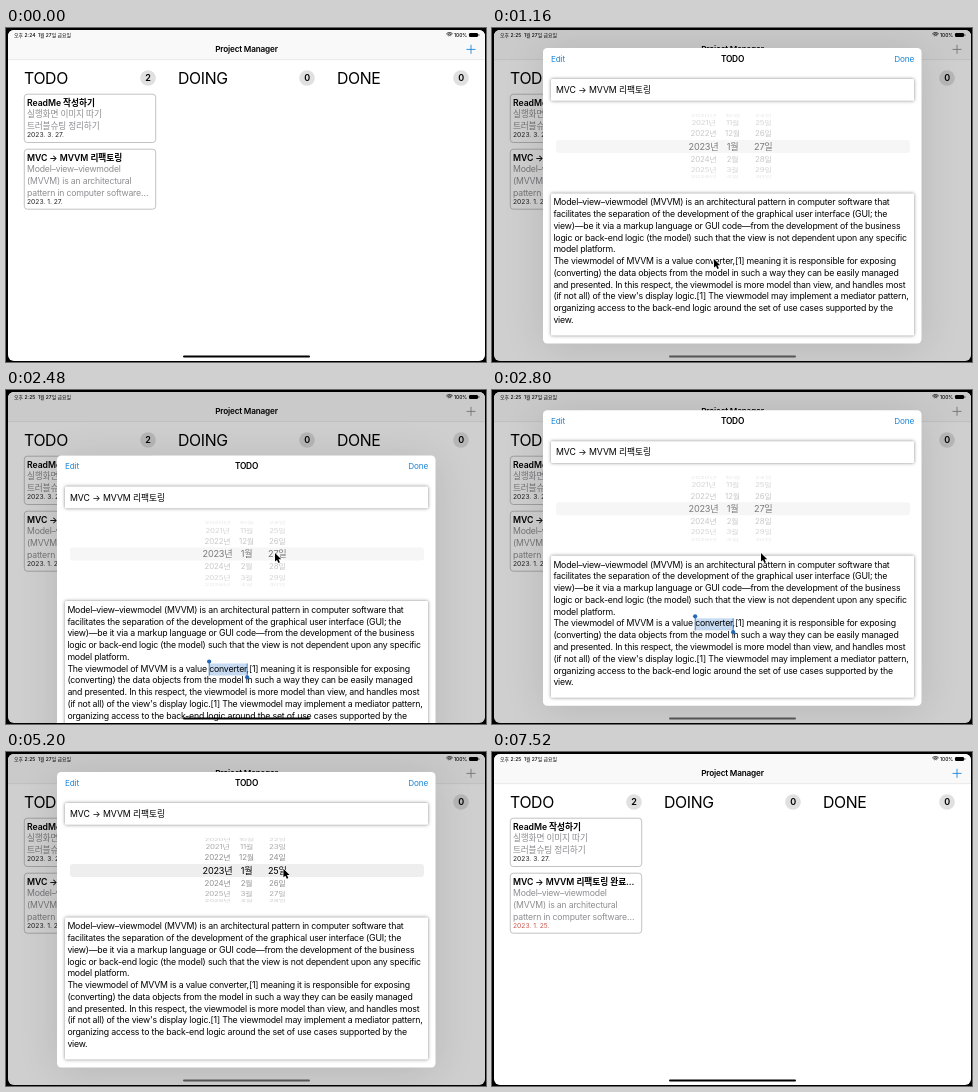
Recreate the animation shown at these times as an HTML page with a canvas. Size 480x334 px, loop 7.56 s.

```html
<!DOCTYPE html>
<html lang="ko">
<head>
<meta charset="utf-8">
<title>Project Manager</title>
<style>
html, body { margin: 0; width: 100%; height: 100%; overflow: hidden; background: #000; }
canvas { display: block; width: 480px; height: 334px; }
</style>
</head>
<body>
<canvas id="stage"></canvas>
<script>
const W = 480, H = 334, LOOP = 7560, STEP = 40;
const FONT = 'Inter, "Noto Sans CJK KR", "Noto Sans CJK", sans-serif';
const BLUE = '#1c86d8', GRAY = '#8e8e92';
const TIGHT = -0.022, LOOSE = -0.007;
const canvas = document.getElementById('stage');
const ratio = window.devicePixelRatio || 1;
canvas.width = W * ratio;
canvas.height = H * ratio;
const ctx = canvas.getContext('2d');

// Times of the main events, in ms
const T = {
  open: 490, minute: 1000, select: 1360, menu: 1440, menuOff: 2080,
  drag: 2160, drop: 2560, edit: 3560, spin: 4280, spun: 4720,
  focus: 5480, type: 5920, save: 6900, hide: 7200
};

// Pointer stops: time, x, y
const STOPS = [
  [120, 86, 113], [360, 109, 166], [520, 109, 166], [720, 211, 167],
  [1080, 222, 231], [1480, 222, 231], [1760, 243, 153], [2000, 268, 117.5],
  [2160, 268, 117.5], [2480, 269, 163], [2800, 269, 163], [3400, 67, 31],
  [3600, 67, 31], [3880, 271, 115], [4280, 271, 115], [4720, 272, 142],
  [5040, 272, 142], [5480, 290, 58], [6560, 290, 58], [6840, 411, 31], [7200, 411, 31]
];

const TYPED = ['', ' ', ' ㅇ', ' 오', ' 와', ' 완', ' 완ㄹ', ' 완료', ' 완룧', ' 완료하', ' 완료학', ' 완료하기'];
const TITLE = 'MVC → MVVM 리팩토링';
const BODY = [
  'Model–view–viewmodel (MVVM) is an architectural pattern in computer software that',
  'facilitates the separation of the development of the graphical user interface (GUI; the',
  'view)—be it via a markup language or GUI code—from the development of the business',
  'logic or back-end logic (the model) such that the view is not dependent upon any specific',
  'model platform.',
  'The viewmodel of MVVM is a value converter,[1] meaning it is responsible for exposing',
  '(converting) the data objects from the model in such a way they can be easily managed',
  'and presented. In this respect, the viewmodel is more model than view, and handles most',
  "(if not all) of the view's display logic.[1] The viewmodel may implement a mediator pattern,",
  'organizing access to the back-end logic around the set of use cases supported by the',
  'view.'
];

const clamp = v => Math.min(1, Math.max(0, v));
const ease = (t, a, b) => { const p = clamp((t - a) / (b - a)); return p * p * (3 - 2 * p); };
// Share of the way left for a critically damped spring
const rest = (t, start, w = 0.029) => {
  const k = Math.max(0, t - start) * w;
  return (1 + k) * Math.exp(-k);
};

function setFont(size, weight = 400, track = TIGHT) {
  ctx.font = `${weight} ${size}px ${FONT}`;
  ctx.letterSpacing = `${track * size}px`;
}

// y is the middle of the capitals
function text(str, x, y, size, { weight = 400, color = '#000', align = 'left', track = TIGHT } = {}) {
  setFont(size, weight, track);
  ctx.fillStyle = color;
  ctx.textAlign = align;
  ctx.fillText(str, x, y + size * 0.36);
}

function textWidth(str, size, track) {
  setFont(size, 400, track);
  return ctx.measureText(str).width;
}

function box(x, y, w, h, r, fill, stroke) {
  ctx.beginPath();
  ctx.roundRect(x, y, w, h, r);
  if (fill) { ctx.fillStyle = fill; ctx.fill(); }
  if (stroke) { ctx.strokeStyle = stroke; ctx.lineWidth = 0.7; ctx.stroke(); }
}

function dot(x, y, r, fill) {
  ctx.beginPath();
  ctx.arc(x, y, r, 0, Math.PI * 2);
  ctx.fillStyle = fill;
  ctx.fill();
}

function withShadow(color, blur, dy, draw) {
  ctx.save();
  ctx.shadowColor = color;
  ctx.shadowBlur = blur * ratio;
  ctx.shadowOffsetY = dy * ratio;
  draw();
  ctx.restore();
}

function statusBar(t) {
  const style = { weight: 500, track: 0 };
  text(t < T.minute ? '오후 2:24' : '오후 2:25', 8, 7, 5, style);
  text('1월 27일 금요일', 32, 7, 4.9, style);
  ctx.strokeStyle = '#000';
  ctx.lineWidth = 0.8;
  for (const r of [1.6, 3, 4.4]) {
    ctx.beginPath();
    ctx.arc(443.5, 9, r, -Math.PI * 0.76, -Math.PI * 0.24);
    ctx.stroke();
  }
  text('100%', 448, 7, 4.9, style);
  box(463, 5, 9, 4, 1.2, '#000');
  box(472.5, 6.2, 0.8, 1.6, 0.4, '#000');
}

function column(name, x, badgeX, count) {
  text(name, x, 50, 15.8);
  dot(badgeX, 50, 7.8, '#e0e0e0');
  text(count, badgeX, 50, 9, { weight: 600, align: 'center' });
}

function card(y, h, title, lines, date, dateColor = '#222') {
  box(18.3, y, 131.4, h, 3, '#fff', '#aaa');
  text(title, 21, y + 8.5, 8.7, { weight: 600, track: LOOSE });
  lines.forEach((line, i) => text(line, 21, y + 20 + i * 11.7, 8.7, { color: GRAY }));
  text(date, 21, y + h - 7.9, 6.7, { color: dateColor, track: 0 });
}

function board(t, dimmed) {
  ctx.fillStyle = '#fff';
  ctx.fillRect(0, 0, W, H);
  ctx.fillStyle = '#f9f9f9';
  ctx.fillRect(0, 0, W, 31.5);
  ctx.fillStyle = '#dedede';
  ctx.fillRect(0, 31.5, W, 0.6);
  statusBar(t);
  text('Project Manager', 240.5, 21.3, 8.2, { weight: 600, align: 'center' });
  ctx.fillStyle = dimmed ? '#8c8c8c' : BLUE;
  ctx.fillRect(460.5, 20.9, 9, 0.9);
  ctx.fillRect(464.55, 16.8, 0.9, 9);

  column('TODO', 18, 142, '2');
  column('DOING', 172, 301, '0');
  column('DONE', 331, 455, '0');
  card(66.2, 48.3, 'ReadMe 작성하기', ['실행화면 이미지 따기', '트러블슈팅 정리하기'], '2023. 3. 27.');
  const saved = t >= T.save + STEP;
  card(121.2, 60, saved ? TITLE + ' 완료…' : TITLE,
    ['Model–view–viewmodel', '(MVVM) is an architectural', 'pattern in computer software…'],
    saved ? '2023. 1. 25.' : '2023. 1. 27.',
    saved ? (t < 7520 ? '#b8504a' : '#c8534b') : '#222');
}

// One column of the date wheel; value may lie between two rows
function wheel(x, value, label) {
  const near = Math.round(value), turn = 0.389, radius = 33.5;
  for (let n = near - 3; n <= near + 3; n++) {
    const d = n - value, angle = d * turn;
    if (Math.abs(angle) > 1.4) continue;
    const picked = Math.abs(d) < 0.5, depth = Math.cos(angle);
    ctx.save();
    ctx.globalAlpha *= picked ? 1 : 0.45 * depth + 0.03;
    ctx.translate(x, 118.5 + radius * Math.sin(angle));
    ctx.scale(1, depth);
    text(label(n), 0, 0, picked ? 9.15 : 7.9, { align: 'center' });
    ctx.restore();
  }
}

function picker(t) {
  ctx.save();
  ctx.globalAlpha = t < T.edit ? 0.5 : 1;
  box(64, 112, 354, 13, 3, '#eeeeef');
  wheel(211.5, 2023, n => n + '년');
  wheel(240.5, 1, n => (n + 11) % 12 + 1 + '월');
  wheel(271.3, 27 - 2 * ease(t, T.spin, T.spun), n => n + '일');
  ctx.restore();
}

function field(y, h) {
  withShadow('rgba(0,0,0,.5)', 3.5, 0, () => box(59, y, 363, h, 1, '#fff'));
}

function titleField(t) {
  field(51, 21.7);
  const n = Math.floor((t - T.type) / STEP) + 1;
  const str = TITLE + TYPED[Math.min(TYPED.length - 1, Math.max(0, n))];
  text(str, 64, 62, 8.75, { track: LOOSE });
  if (t >= T.focus && t < T.save) {
    ctx.fillStyle = '#3b78e0';
    ctx.fillRect(64.3 + textWidth(str, 8.75, LOOSE), 56.8, 0.8, 10.4);
  }
}

function bodyField(t) {
  const size = 8.76, x = 61.4, y = 174.2, gap = 11.76;
  field(165.5, 142);
  const selected = t >= T.select && t < T.edit;
  const left = x + textWidth('The viewmodel of MVVM is a value ', size);
  const right = left + textWidth('converter', size);
  if (selected) {
    ctx.fillStyle = '#c6daf1';
    ctx.fillRect(left, 228, right - left, 12);
  }
  BODY.forEach((line, i) => text(line, x, y + i * gap, size));
  if (selected) {
    ctx.fillStyle = '#2467b5';
    ctx.fillRect(left - 0.4, 226, 0.8, 14);
    ctx.fillRect(right - 0.4, 228, 0.8, 14);
    dot(left, 226, 2.1, '#2467b5');
    dot(right, 241.8, 2.1, '#2467b5');
  }
  if (t >= T.menu && t < T.menuOff) menu((left + right) / 2, clamp((t - T.menu + STEP) / 120));
}

function menu(tip, alpha) {
  ctx.save();
  ctx.globalAlpha = alpha;
  withShadow('rgba(0,0,0,.3)', 9, 1, () => {
    ctx.beginPath();
    ctx.roundRect(110.5, 204, 221.5, 16, 3);
    ctx.moveTo(tip - 4, 220);
    ctx.lineTo(tip + 4, 220);
    ctx.lineTo(tip, 224);
    ctx.fillStyle = '#efeff0';
    ctx.fill();
  });
  const items = [['Copy', 127], ['Look Up', 165.3], ['Translate', 211], ['Search Web', 263.5], ['Share…', 312]];
  for (const [label, x] of items) text(label, x, 212, 7.6, { align: 'center' });
  ctx.fillStyle = '#d2d2d4';
  for (const x of [143.5, 187.5, 234.5, 292]) ctx.fillRect(x, 204, 0.5, 16);
  ctx.restore();
}

function button(label, x, align, pressed) {
  ctx.save();
  if (pressed) ctx.globalAlpha = 0.3;
  text(label, x, 30.6, 8.2, { color: BLUE, align });
  ctx.restore();
}

function sheet(t, dy) {
  ctx.save();
  ctx.translate(0, dy);
  withShadow('rgba(0,0,0,.12)', 42, 4, () => box(51, 20, 378.5, 295.5, 4.2, '#fff'));
  button('Edit', 59, 'left', t >= T.edit - 80 && t < T.edit);
  text('TODO', 240.5, 30.6, 8.3, { weight: 600, align: 'center' });
  button('Done', 422, 'right', t >= T.save - 60 && t < T.save + STEP);
  titleField(t);
  picker(t);
  bodyField(t);
  ctx.restore();
}

function pointerAt(t) {
  if (t < STOPS[0][0] || t >= T.hide) return null;
  const i = STOPS.findIndex(s => s[0] > t);
  const [t0, x0, y0] = STOPS[i - 1], [t1, x1, y1] = STOPS[i];
  const p = ease(t, t0, t1);
  return { x: x0 + (x1 - x0) * p, y: y0 + (y1 - y0) * p };
}

function pointer({ x, y }) {
  ctx.save();
  ctx.translate(x, y);
  ctx.beginPath();
  [[0, 0], [0, 8.6], [2, 6.9], [3.4, 10], [4.9, 9.3], [3.5, 6.3], [6.2, 6.2]]
    .forEach(([px, py]) => ctx.lineTo(px, py));
  ctx.closePath();
  ctx.lineJoin = 'round';
  ctx.lineWidth = 1.2;
  ctx.strokeStyle = '#fff';
  ctx.stroke();
  ctx.fillStyle = '#000';
  ctx.fill();
  ctx.restore();
}

// How far the sheet hangs below its place
function sheetOffset(t, mouse) {
  if (t < T.drag) return 314 * rest(t, T.open);
  if (t < T.drop) return mouse.y - 117.5;
  if (t < T.save) return 45.5 * rest(t, T.drop);
  return 314 * (1 - rest(t, T.save));
}

function draw(t) {
  const mouse = pointerAt(t);
  const open = t > T.open && t < 7280;
  const shown = t < T.save ? 1 - rest(t, T.open) : rest(t, T.save);
  const dy = open ? sheetOffset(t, mouse) : H;

  ctx.setTransform(ratio, 0, 0, ratio, 0, 0);
  ctx.fillStyle = '#000';
  ctx.fillRect(0, 0, W, H);
  ctx.save();
  ctx.beginPath();
  ctx.roundRect(2, 2, 477, 331, 6);
  ctx.clip();
  board(t, open && shown > 0.3);
  if (open) {
    ctx.fillStyle = `rgba(0,0,0,${0.19 * shown})`;
    ctx.fillRect(0, 0, W, H);
    sheet(t, dy);
  }
  // The home bar is softer while it lies on the dimmed board
  box(177, 327.5, 127, 2.1, 1.05, dy < 12 ? '#555' : '#000');
  if (mouse) pointer(mouse);
  ctx.restore();
}

const begin = performance.now();
function tick() {
  const t = (performance.now() - begin) % LOOP;
  draw(Math.floor(t / STEP) * STEP);
  requestAnimationFrame(tick);
}
tick();
</script>
</body>
</html>
```
